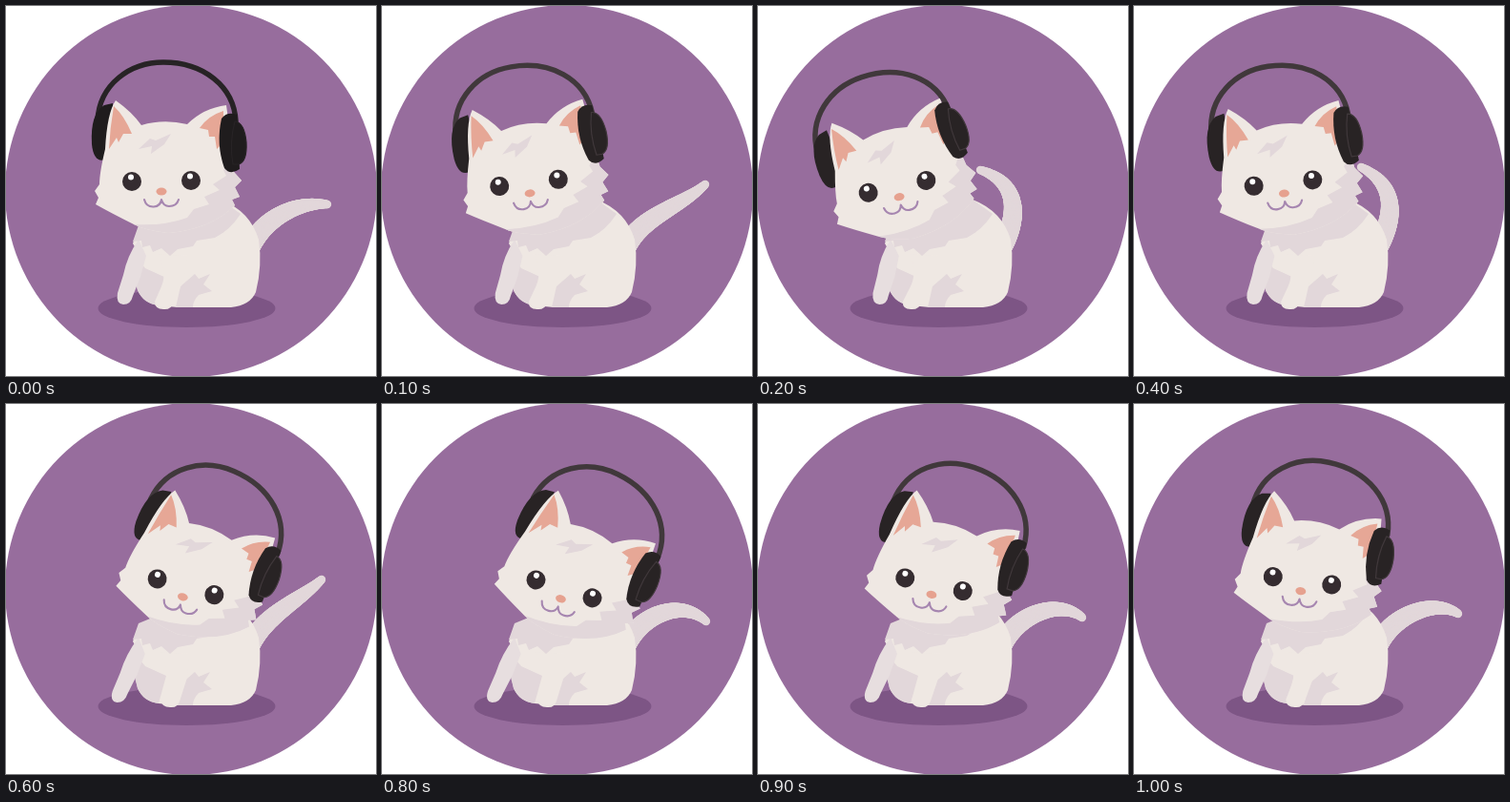
Animation of 388 by 388 pixels, one loop 1.1 s. Source, as an HTML page with a canvas:

```html
<!DOCTYPE html>
<html lang="en">
<head>
<meta charset="utf-8">
<title>Cat with headphones</title>
<style>
html, body { margin: 0; width: 100%; height: 100%; overflow: hidden; background: #fff; }
canvas { display: block; width: 100vw; height: 100vh; }
</style>
</head>
<body>
<canvas id="stage" width="388" height="388"></canvas>
<script>
const ctx = document.getElementById('stage').getContext('2d');
const LOOP = 1100;
const CX = 163, CY = 183.5; // head pivot at rest
const FUR = '#efe8e3', SHADE = '#e2d7da', LEG = '#e7dedf', PINK = '#e6a796';

// start ms, pivot x, y, tilt, tail control x, y, tail tip x, y
const poses = [
  [0, 163, 183.5, 0, 308, 205, 337, 208],
  [100, 154, 186, -8, 314, 210, 339, 187],
  [200, 146, 191.5, -15.3, 274, 185, 233, 172],
  [400, 156.5, 186, -6.9, 276, 188, 238, 169],
  [500, 181, 185.3, 14, 282, 195, 281, 157],
  [600, 188.5, 187, 23, 308, 206, 331, 184],
  [800, 191, 187.8, 26, 315, 204, 340, 228],
  [900, 184.5, 186, 19, 316, 204, 340, 224],
  [1000, 176.5, 184, 12, 316, 204, 340, 220]
];

const paths = {
  body: 'M139,232 L133,249 L137,256 Q132,275 138,298 Q144,312 160,314 L180,316 L236,316 ' +
    'Q256,314 262,300 Q269,272 265,245 Q256,215 225,203 L190,205Z',
  chest: 'M139,230 L133,247 L142,246 L143,253 L151,251 L154,258 L163,254 L172,262 L180,255 ' +
    'L196,252 L200,246 L219,243 Q235,235 246,218 L225,203 L200,205Z',
  under: 'M135,262 Q132,280 138,298 Q144,312 160,314 L168,285 L146,275Z',
  belly: 'M178,316 L183,294 L198,281 L202,286 L214,281 L207,292 L216,299 L202,303 Q196,309 196,316Z',
  farLeg: 'M139,245 Q127,262 123,282 L117,301 Q115,312 123,313 Q131,313 133,304 L141,284 L147,262Z',
  nearLeg: 'M160,260 Q169,280 163,294 L156,310 Q156,318 165,318 Q173,319 176,311 L187,285 L190,262Z',
  head: 'M104,150 Q106,112 115,99 Q132,111 142,125 Q165,118 190,124 Q207,107 231,104 ' +
    'Q235,130 236,160 L239,174 L247,183 L240,190 L245,200 L237,203 L240,209 ' +
    'Q215,234 170,238 Q145,235 134,229 Q110,217 94,208 L97,201 L93,194 L98,187 Q98,175 104,150Z',
  cheek: 'M236,160 L228,172 L231,178 L217,187 L224,193 L208,200 L213,208 L197,213 L190,222 ' +
    'Q165,231 134,229 Q145,235 170,238 Q215,234 240,209 L237,203 L245,200 L240,190 L247,183 L239,174Z',
  tuft: 'M139,150 L151,139 L157,141 L173,134 L166,145 L152,155 L153,147Z',
  earL: 'M113,105 Q109,128 108,150 L116,138 L118,143 L123,134 L132,134 Q124,115 113,105Z',
  earR: 'M228,110 Q212,115 203,128 L212,130 L213,137 L219,137 L221,150 L228,143Z',
  cupL: 'M103,104 L112,102 Q115,130 104,161 Q92,165 90,145 Q88,113 103,104Z',
  padR: 'M226,118 Q232,110 242,114 L245,171 Q235,178 229,170 Q220,145 226,118Z',
  discR: 'M240,121 Q250,122 252,143 Q253,163 244,166 L238,166 Q234,143 240,121Z',
  band: 'M96,120 C98,82 130,59 165,59 C207,59 239,84 241,121',
  mouth: 'M145,203 Q147,211 155,210.5 Q162,210 163,203 Q165,210 171,210 Q179,210 181,203'
};

const mapped = (d, map) => new Path2D(
  map ? d.replace(/([\d.]+),([\d.]+)/g, (_, x, y) => map(+x, +y).join(',')) : d
);

function fill(name, color, map) {
  ctx.fillStyle = color;
  ctx.fill(mapped(paths[name], map));
}

function line(name, color, width) {
  ctx.strokeStyle = color;
  ctx.lineWidth = width;
  ctx.lineCap = ctx.lineJoin = 'round';
  ctx.stroke(mapped(paths[name]));
}

function oval(x, y, rx, ry, color) {
  ctx.fillStyle = color;
  ctx.beginPath();
  ctx.ellipse(x, y, rx, ry, 0, 0, Math.PI * 2);
  ctx.fill();
}

function tilted(x, y, angle, draw) {
  ctx.save();
  ctx.translate(x, y);
  ctx.rotate(angle);
  ctx.translate(-CX, -CY);
  draw();
  ctx.restore();
}

// Tapered stroke along a cubic curve
function tail(cx, cy, tx, ty) {
  const bez = (t, a, b, c, d) => {
    const u = 1 - t;
    return u * u * u * a + 3 * u * u * t * b + 3 * u * t * t * c + t * t * t * d;
  };
  for (let i = 0; i <= 150; i++) {
    const t = i / 150, r = 10.5 - 6.3 * t * t;
    oval(bez(t, 257, 273, cx, tx), bez(t, 251, 220, cy, ty), r, r, SHADE);
  }
}

function eye(x, y) {
  oval(x, y, 10, 10, '#352c30');
  oval(x - 1, y - 4.5, 3, 3, '#fff');
}

function draw([start, x, y, deg, ...tailEnd]) {
  const tilt = deg * Math.PI / 180, faceTilt = tilt * 0.72;
  const faceY = y + 0.009 * deg * Math.abs(deg);
  const phoneTilt = Math.min(tilt, tilt * 1.2);
  const bandColor = start ? '#40383b' : '#272325';
  const cupColor = start ? '#282324' : '#1f1c1d';

  // The crown leans further than the chin
  const lean = (px, py) => {
    const k = Math.min(1, Math.max(0, (CY - py) / 54));
    const a = faceTilt + (tilt - faceTilt) * k;
    const dx = px - CX, dy = py - CY, c = Math.cos(a), s = Math.sin(a);
    return [x + dx * c - dy * s, y + dx * s + dy * c];
  };
  const step = dir => (px, py) => [px + dir * deg * 0.27 * Math.max(0, py - 250) / 60, py];

  ctx.fillStyle = '#fff';
  ctx.fillRect(0, 0, 388, 388);
  oval(194, 194, 195, 195, '#976d9d');
  oval(189.5, 317, 93, 20, '#7d5585');

  tail(...tailEnd);
  fill('body', FUR);
  fill('under', SHADE);
  fill('farLeg', LEG, step(-1));
  fill('belly', SHADE);
  fill('nearLeg', FUR, step(1));
  fill('chest', SHADE);

  tilted(x, y - 0.12 * deg, phoneTilt, () => line('band', bandColor, 5.5));
  tilted(x, y, phoneTilt, () => fill('cupL', cupColor));

  fill('head', FUR, lean);
  fill('cheek', SHADE, lean);
  fill('tuft', SHADE, lean);
  fill('earL', PINK, lean);
  fill('earR', PINK, lean);

  tilted(x, faceY, faceTilt, () => {
    eye(132, 184);
    eye(194, 183);
    oval(163, 194.5, 5.5, 4, '#e6a18f');
    line('mouth', '#a686b0', 2.1);
  });

  tilted(x, y, phoneTilt, () => {
    fill('padR', cupColor);
    fill('discR', cupColor);
    line('discR', bandColor, 1.2);
  });
}

function tick() {
  const t = performance.now() % LOOP;
  draw(poses.filter(p => p[0] <= t).pop());
  requestAnimationFrame(tick);
}
tick();
</script>
</body>
</html>
```
